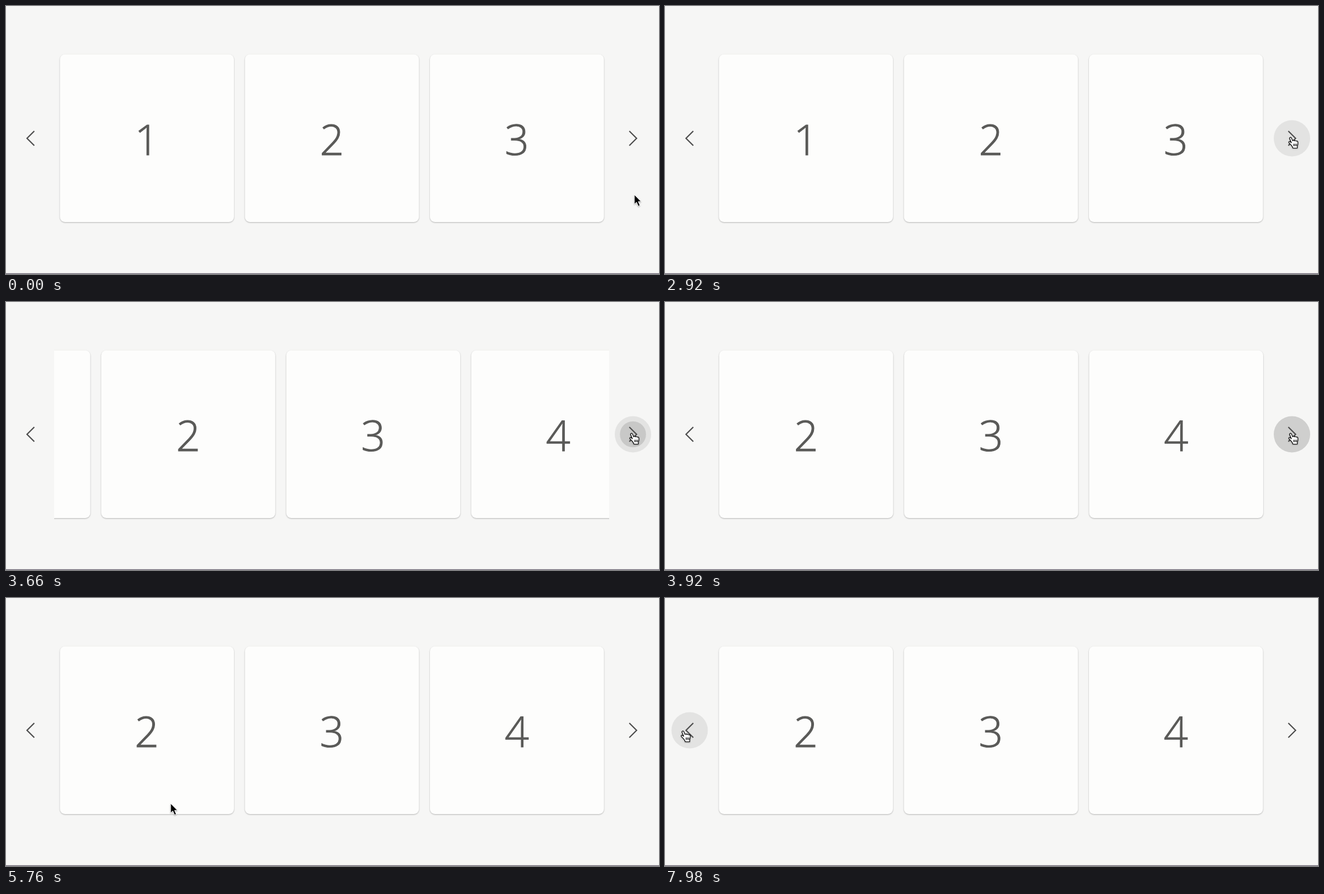
Recreate the animation shown at these times as an HTML page. Size 1166 by 480 pixels, loop 8000 ms.

```html
<!DOCTYPE html>
<html lang="en">
<head>
<meta charset="utf-8">
<title>Card carousel</title>
<style>
  html, body { margin: 0; width: 100%; height: 100%; overflow: hidden; background: #f6f6f5; }
  svg { display: block; }
  .card rect { fill: #fdfdfc; filter: drop-shadow(0 1px 1px rgba(0, 0, 0, .27)); }
  .card text {
    font: 300 76px "Open Sans", "Noto Sans", sans-serif;
    fill: #5a5a58; stroke: #5a5a58; stroke-width: 1.1; text-anchor: middle;
  }
  .chevron { fill: none; stroke: #4c4c4c; stroke-width: 2.2; }
  .cursor { filter: drop-shadow(0 1px 1px rgba(0, 0, 0, .35)); }
</style>
</head>
<body>
<svg width="1166" height="480" viewBox="0 0 1166 480">
  <clipPath id="view"><rect x="86" y="77" width="991" height="320"/></clipPath>
  <g clip-path="url(#view)"><g id="cards"></g></g>

  <circle id="hoverLeft" cx="44" cy="237" r="32.5"/>
  <circle id="hoverRight" cx="1119.5" cy="237" r="32.5"/>
  <circle id="ripple" cx="1119.5" cy="237"/>
  <path class="chevron" d="M50.5 224L37.5 237L50.5 250"/>
  <path class="chevron" d="M1113 224L1126 237L1113 250"/>

  <rect y="478.7" width="1166" height="1.3" fill="#6a6472"/>

  <path id="arrow" class="cursor" stroke="#fff" d="M0 0V17L3.9 13.4L7 20.6L10 19.3L7 12.3H12Z"/>
  <g id="hand" class="cursor" stroke="#000" stroke-width="1.2" stroke-linejoin="round">
    <path fill="#fff" d="M3.5 16.5C2 13.5 0 12-2 9.8C-4.3 7.6-2.5 6-.5 7.2L1.4 8.8L-1.6 1.6
      C-2.3-.8 .6-2 1.6 .4L3.8 5.6C4.1 4.2 6.5 4 6.9 5.6C7.5 4.6 9.7 4.8 10.1 6.2
      C10.9 5.4 12.8 5.8 13 7.6C13.4 11 13.2 12.5 12.2 14.5L12 18.5H4.2Z"/>
    <path d="M5.8 10.8V15M8.2 10.8V15M10.6 10.8V15"/>
  </g>
</svg>
<script>
const LOOP = 8000;
const PITCH = 991 / 3;
const BUTTON = 32.5;
const LEFT = 44, RIGHT = 1119.5, MIDDLE = 237;

const el = id => document.getElementById(id);
const set = (id, attrs) => {
  for (const name in attrs) el(id).setAttribute(name, attrs[name]);
};
const clamp = v => Math.min(1, Math.max(0, v));
const progress = (t, start, duration) => clamp((t - start) / duration);
const smooth = k => k * k * (3 - 2 * k);

// CSS "ease": cubic-bezier(.25, .1, .25, 1)
function ease(x) {
  const bezier = (p, q, u) => 3 * p * u * (1 - u) ** 2 + 3 * q * u * u * (1 - u) + u ** 3;
  let lo = 0, hi = 1;
  for (let i = 0; i < 24; i++) {
    const mid = (lo + hi) / 2;
    if (bezier(.25, .25, mid) < x) lo = mid; else hi = mid;
  }
  return bezier(.1, 1, lo);
}

const glides = [
  { start: 440, duration: 800, x: 1117, y: 236 },
  { start: 4320, duration: 280, x: 1124, y: 256 },
  { start: 4600, duration: 1160, x: 294, y: 368 },
  { start: 5760, duration: 1200, x: 32, y: 239 }
];

function pointer(t) {
  let x = 1122, y = 338;
  for (const glide of glides) {
    const k = smooth(progress(t, glide.start, glide.duration));
    x += (glide.x - x) * k;
    y += (glide.y - y) * k;
  }
  return [x, y];
}

el('cards').innerHTML = [1, 2, 3, 4].map((n, i) => {
  const x = 86 + i * PITCH;
  return `<g class="card"><rect x="${x + 10.3}" y="86.5" width="${PITCH - 19.6}" height="300.5" rx="9"/>` +
    `<text x="${x + PITCH / 2 + .4}" y="267">${n}</text></g>`;
}).join('');

function draw(t) {
  const slide = ease(progress(t, 3402, 545)) * PITCH;
  set('cards', { transform: `translate(${-slide} 0)` });

  // Buttons shade in as the pointer moves inside their edge
  const [x, y] = pointer(t);
  const depth = cx => BUTTON - Math.hypot(x - cx, y - MIDDLE);
  set('hoverLeft', { opacity: .08 * clamp(depth(LEFT) / 12) });
  set('hoverRight', { opacity: .08 * clamp(depth(RIGHT) / 12) });

  set('ripple', {
    r: BUTTON * progress(t, 3270, 545),
    opacity: .12 * progress(t, 3270, 380) * (1 - progress(t, 3820, 400))
  });

  const over = depth(LEFT) > 0 || depth(RIGHT) > 0;
  const transform = `translate(${x} ${y})`;
  set('arrow', { transform, visibility: over ? 'hidden' : 'visible' });
  set('hand', { transform, visibility: over ? 'visible' : 'hidden' });
}

const start = performance.now();
function tick() {
  draw((performance.now() - start) % LOOP);
  requestAnimationFrame(tick);
}
tick();
</script>
</body>
</html>
```
